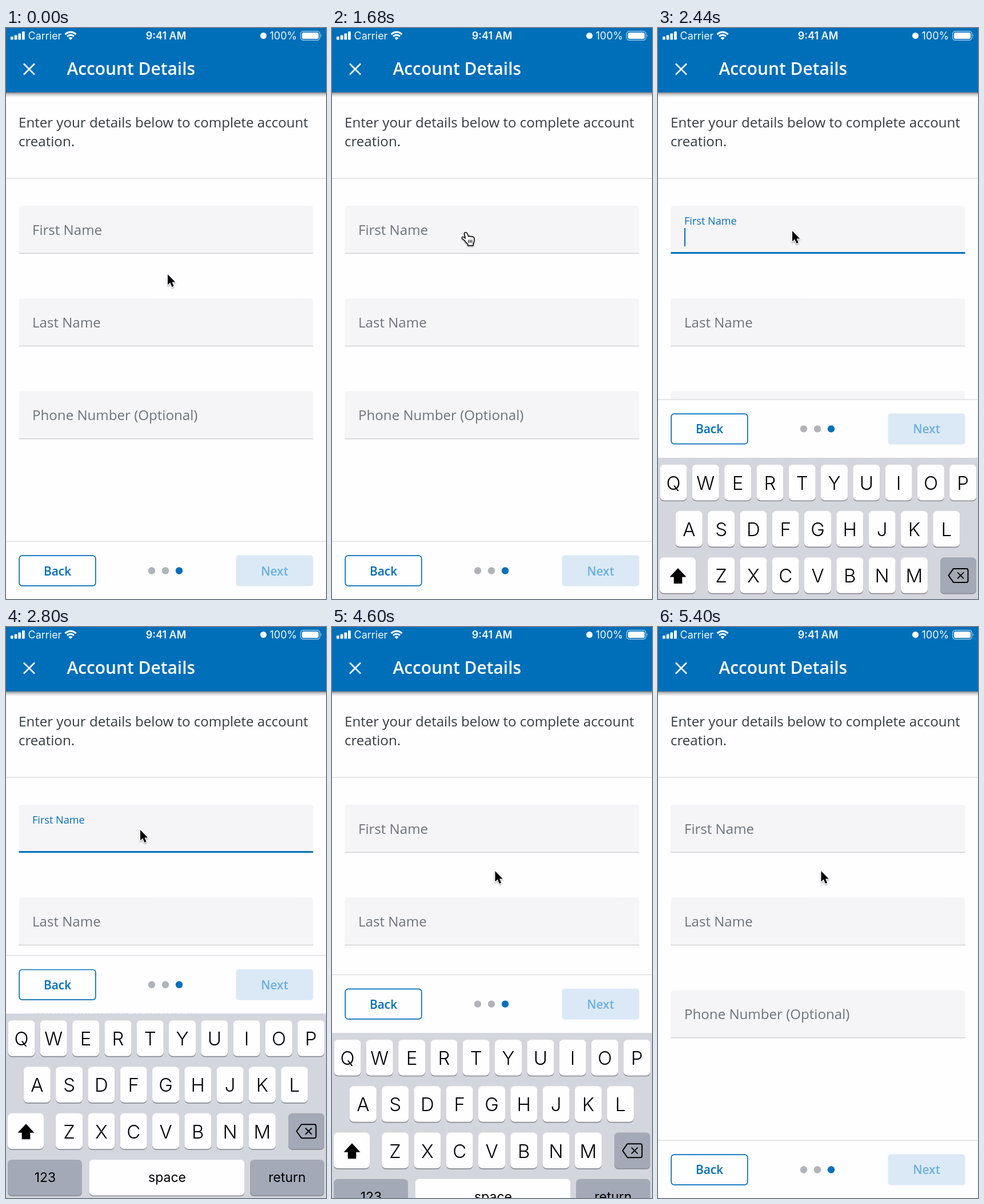
Write an HTML page that moves like this. It is 560 by 999 pixels and loops after 6120 ms.

```html
<!DOCTYPE html>
<html lang="en">
<head>
<meta charset="utf-8">
<title>Account Details</title>
<style>
  html, body { margin: 0; width: 100%; height: 100%; overflow: hidden; background: #fefdff; }
  svg { display: block; width: 100%; height: 100%; }
  text { font-family: "Open Sans", "Noto Sans", sans-serif; }
  .ui { font-family: Inter, Roboto, sans-serif; }
  .semi { font-weight: 600; }
  .mid { text-anchor: middle; }
  .label { font-size: 24.1px; fill: #6c747b; }
  .key { font-size: 33px; font-weight: 300; }
  .word { font-size: 23px; }
  .status { font-size: 18px; fill: #f4f9fd; }
</style>
</head>
<body>
<svg viewBox="0 0 560 999">
  <defs>
    <linearGradient id="shade" x2="0" y2="1">
      <stop stop-color="#000" stop-opacity=".55"/>
      <stop offset=".4" stop-color="#000" stop-opacity=".22"/>
      <stop offset="1" stop-color="#000" stop-opacity="0"/>
    </linearGradient>
    <filter id="drop" x="-50%" y="-50%" width="200%" height="200%">
      <feDropShadow dx="0" dy="1.5" stdDeviation="1.2" flood-opacity=".4"/>
    </filter>
  </defs>
  <rect width="560" height="999" fill="#fefdff"/>

  <g font-size="24.1" fill="#343b42">
    <text x="22" y="174">Enter your details below to complete account</text>
    <text x="22" y="207">creation.</text>
  </g>
  <rect y="262.3" width="560" height="1.5" fill="#dfdfe3"/>
  <g id="fields"></g>
  <rect id="focusLine" x="22.5" y="392" width="515" height="3" fill="#006fba"/>
  <rect id="caret" x="46" y="350" width="2" height="32" fill="#006fba"/>

  <g id="sheet">
    <rect y="898" width="560" height="102" fill="#fefdff"/>
    <rect y="897.5" width="560" height="1.5" fill="#dfdfe3"/>
    <rect x="23.2" y="923.2" width="133.6" height="52.6" rx="5" fill="none" stroke="#006fba" stroke-width="1.7"/>
    <rect x="402.5" y="922.5" width="135" height="54" rx="5" fill="#dbe9f6"/>
    <g class="semi mid" font-size="20.9">
      <text x="90" y="957.5" fill="#006fba">Back</text>
      <text x="470" y="957.5" fill="#6bb0dd">Next</text>
    </g>
    <g fill="#b0b3ba">
      <circle cx="255" cy="949.5" r="6.2"/>
      <circle cx="279" cy="949.5" r="6.2"/>
      <circle cx="303" cy="949.5" r="6.2" fill="#006fba"/>
    </g>
    <g id="keyboard" transform="translate(0 1000)">
      <rect width="560" height="324" fill="#d4d6dd"/>
    </g>
  </g>

  <rect y="112" width="560" height="9" fill="url(#shade)"/>
  <rect width="560" height="112.5" fill="#006fba"/>
  <path d="M31 62.5l19 19m0-19l-19 19" stroke="#fff" stroke-width="2.6"/>
  <text class="semi" x="106.5" y="82" font-size="29.9" fill="#fff">Account Details</text>

  <g fill="#fff">
    <rect x="8" y="15" width="4.7" height="5.5" rx="1"/>
    <rect x="14.7" y="12.5" width="4.7" height="8" rx="1"/>
    <rect x="21.4" y="9.5" width="4.7" height="11" rx="1"/>
    <rect x="28.1" y="6" width="4.7" height="14.5" rx="1"/>
    <path d="M113 21l-3.6-3.7q3.6-3 7.2 0z"/>
    <path d="M107 14.6q6-5 12 0M103.4 11q9.6-8 19.2 0" fill="none" stroke="#fff" stroke-width="3"/>
    <circle cx="450.5" cy="13.5" r="5.5"/>
    <rect x="515.7" y="5.7" width="33.6" height="15.6" rx="4.5" fill="none" stroke="#9cc8e6" stroke-width="1.4"/>
    <rect x="518" y="8" width="29" height="11" rx="2.5"/>
    <path d="M551 11q2.4 2.5 0 5z" fill="#9cc8e6"/>
  </g>
  <text class="ui status" x="38.5" y="19.5">Carrier</text>
  <text class="ui status semi mid" x="280" y="19.5">9:41 AM</text>
  <text class="ui status" x="461.5" y="19.5">100%</text>

  <g id="pointer" filter="url(#drop)" stroke-linejoin="round">
    <path id="arrow" d="M0 0V18.6L4.3 14.6L7.4 22L10.6 20.6L7.5 13.4H13.2Z" fill="#000" stroke="#fff" stroke-width="2.2" paint-order="stroke"/>
    <g id="hand" transform="translate(-235 -355)" stroke="#000" stroke-width="1.5">
      <path fill="#fff" d="M232 362q-1.5-3.5 1-4.3 2.3-.8 3.6 2l2.4 5q1.5-1.3 3.2.2 1.7-1 3.2.6 2-.8 3 1.2.9 3 .4 6-.4 3-1.6 4v3.8h-9.6v-2.6q-3-2-5-5.5-2-2.6-4.6-3.5-1.6-2 .5-3.4 2-.3 4.8 2.5z"/>
      <path fill="none" stroke-width="1.2" d="M239.4 370.5v5.5m2.7-5.5v5.5m2.7-5.5v5.5"/>
    </g>
  </g>
</svg>
<script>
const LOOP = 6120;
const $ = id => document.getElementById(id);
const add = (id, markup) => $(id).insertAdjacentHTML('beforeend', markup);

['First Name', 'Last Name', 'Phone Number (Optional)'].forEach((name, i) => add('fields',
  `<g transform="translate(0 ${i * 162.2})">
    <path d="M22.5 395V317q0-6 6-6H531.5q6 0 6 6V395z" fill="#f5f4f7"/>
    <rect x="22.5" y="393.5" width="515" height="1.5" fill="#d3d3d8"/>
    <text class="label" x="46" y="362">${name}</text>
  </g>`));
const firstLabel = document.querySelector('.label');

function key(x, row, width, content = '', fill = '#fefdff') {
  const y = 12 + row * 81.2;
  const shape = (dy, color) => `<rect x="${x}" y="${y + dy}" width="${width}" height="62.5" rx="7" fill="${color}"/>`;
  add('keyboard', shape(1.7, '#8b8d93') + shape(0, fill) + content);
}
const caption = (text, x, y, style) => `<text class="ui mid ${style}" x="${x}" y="${y}">${text}</text>`;

[['QWERTYUIOP', 27], ['ASDFGHJKL', 54.3], ['ZXCVBNM', 110.6]].forEach(([letters, start], row) =>
  [...letters].forEach((letter, i) => {
    const x = start + i * 56.3;
    key(x - 23.5, row, 47, caption(letter, x, 56 + row * 81.2, 'key'));
  }));

const GREY = '#a3a9b6';
key(3, 2, 63, '<path d="M35 193L49.5 208.5H42.3V220H27.7V208.5H20.5Z"/>');
key(494, 2, 63, `<path d="M517 194H539.5q3 0 3 3V215q0 3-3 3H517L508.5 206ZM524 200.5l11 11m0-11l-11 11"
  fill="none" stroke="#000" stroke-width="2" stroke-linejoin="round"/>`, GREY);
key(3, 3, 130, caption('123', 68.5, 295, 'word'), GREY);
key(145.5, 3, 272, caption('space', 282, 295, 'word'));
key(427, 3, 130, caption('return', 492, 295, 'word'), GREY);

const ramp = (t, from, to) => Math.min(1, Math.max(0, (t - from) / (to - from)));
const smooth = p => p * p * (3 - 2 * p);
// Critically damped spring from 0 to 1
const spring = t => t < 0 ? 0 : 1 - (1 + .0183 * t) * Math.exp(-.0183 * t);

// Pointer stops: time, x, y
const stops = [
  [80, 283, 431], [120, 282.5, 431], [320, 282.5, 431], [440, 282, 430],
  [1200, 282, 430], [1640, 235, 355], [3360, 235, 355],
  [3720, 281, 416], [3960, 283, 425], [4000, 283, 425], [4120, 285.5, 427]
];
function pointerAt(t) {
  let [, x, y] = stops[0];
  for (let i = 1; i < stops.length; i++) {
    const [t0, x0, y0] = stops[i - 1], [t1, x1, y1] = stops[i];
    const p = smooth(ramp(t, t0, t1));
    x += (x1 - x0) * p;
    y += (y1 - y0) * p;
  }
  return [x, y];
}

function draw(t) {
  const focus = smooth(ramp(t, 2060, 2240)) - smooth(ramp(t, 4300, 4480));
  firstLabel.setAttribute('y', 362 - 18 * focus);
  firstLabel.style.fontSize = 24.1 - 6 * focus + 'px';
  firstLabel.style.fill = `color-mix(in srgb, #006fba ${focus * 100}%, #6c747b)`;
  $('focusLine').setAttribute('opacity', focus);

  const caret = ramp(t, 2110, 2160) - ramp(t, 2700, 2790) + ramp(t, 3160, 3320) - ramp(t, 3760, 3900);
  $('caret').setAttribute('opacity', caret);

  const lift = 324 * (spring(t - 2289) - spring(t - 4571));
  $('sheet').setAttribute('transform', `translate(0 ${-lift})`);

  const [x, y] = pointerAt(t);
  const hovering = t < 2100 && y < 395;
  $('pointer').setAttribute('transform', `translate(${x} ${y})`);
  $('hand').style.display = hovering ? '' : 'none';
  $('arrow').style.display = hovering ? 'none' : '';
}

function tick() {
  draw(performance.now() % LOOP);
  requestAnimationFrame(tick);
}
tick();
</script>
</body>
</html>
```
